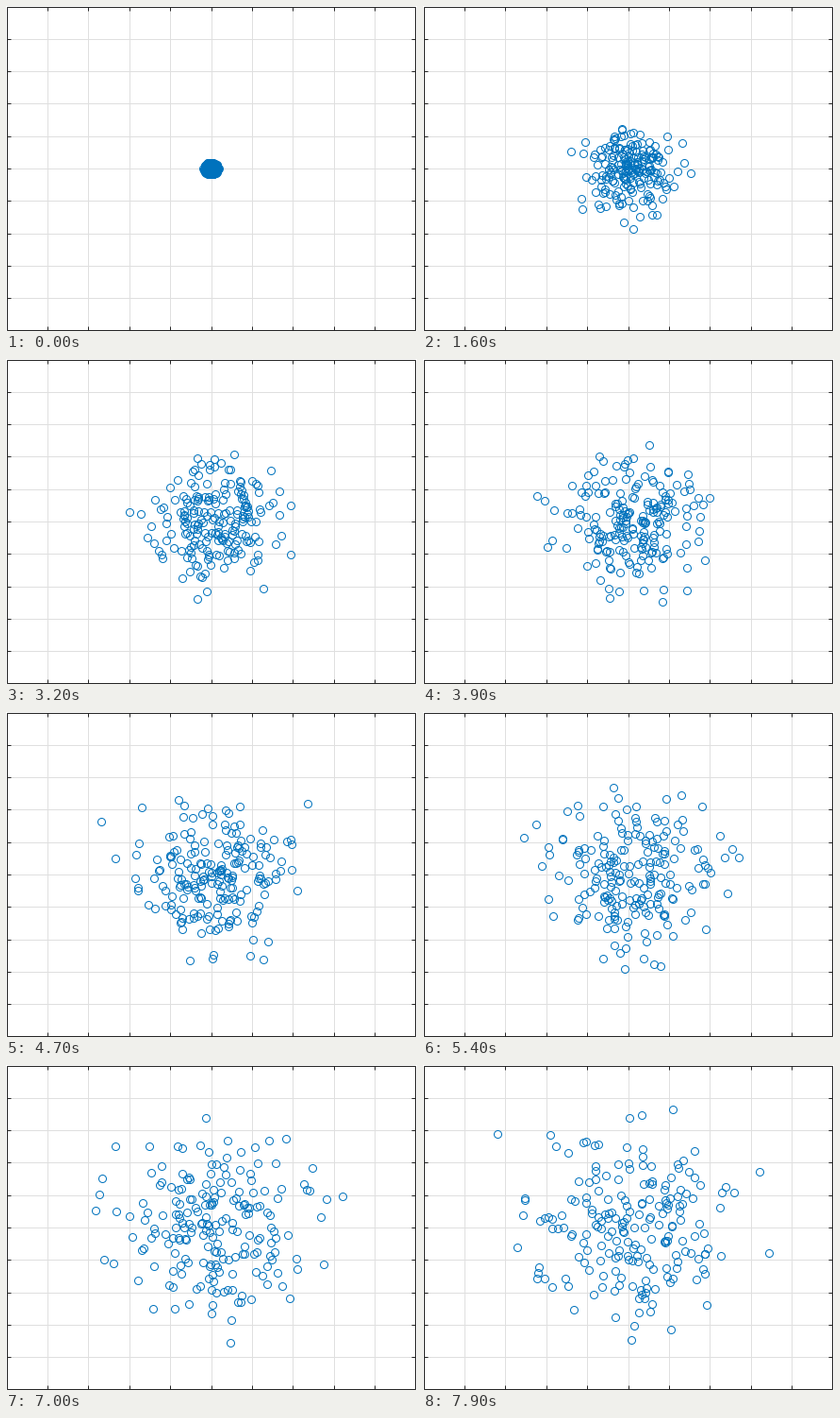
A matplotlib script that plays this animation: 436 px wide and 344 px high, repeating every 8000 ms.

```python
import numpy as np
import matplotlib.pyplot as plt
from matplotlib.animation import FuncAnimation
from matplotlib.collections import EllipseCollection

W, H, DPI = 436, 344, 100
PX = 72 / DPI                      # one pixel in points
FRAMES, COUNT, STEP = 80, 200, 0.2
CENTER = np.array([217.5, 172.0])
UNIT = np.array([43.35, 34.28])    # pixels per axis unit
TICK, DIAMETER = 4, 8
BLUE, DARK, GRID = "#0072bd", "#262626", "#dfdfdf"


def to_pixel(points):
    """Centre of the pixel nearest to each axis position."""
    return np.round(points) + 0.5


def make_walks():
    """Random walks with steps of fixed length, shaped (walker, step, xy)."""
    rng = np.random.default_rng(7)
    angle = rng.uniform(0, 2 * np.pi, (COUNT, FRAMES))
    length = np.full((COUNT, FRAMES), STEP)
    length[:, 0] *= 0.95 * np.sqrt(rng.random(COUNT))   # start in a disc
    moves = length[..., None] * np.stack([np.cos(angle), np.sin(angle)], -1)
    return to_pixel(CENTER + UNIT * moves.cumsum(axis=1))


def draw_axes(ax):
    ticks = np.arange(-5, 6)
    xs = to_pixel(CENTER[0] + UNIT[0] * ticks)
    ys = to_pixel(CENTER[1] + UNIT[1] * ticks)
    left, right, top, bottom = xs[0], xs[-1], ys[0], ys[-1]

    def line(x, y, color, z):
        ax.plot(x, y, color=color, lw=PX, snap=False, zorder=z,
                solid_capstyle="butt", solid_joinstyle="miter")

    for x in xs[1:-1]:
        line([x, x], [top, bottom], GRID, 1)
        line([x, x], [top, top + TICK], DARK, 2)
        line([x, x], [bottom - TICK, bottom], DARK, 2)
    for y in ys[1:-1]:
        line([left, right], [y, y], GRID, 1)
        line([left, left + TICK], [y, y], DARK, 2)
        line([right - TICK, right], [y, y], DARK, 2)
    ax.add_patch(plt.Rectangle((left, top), right - left, bottom - top,
                               fill=False, ec=DARK, lw=PX, snap=False,
                               zorder=2))


fig = plt.figure(figsize=(W / DPI, H / DPI), dpi=DPI, facecolor="white")
ax = fig.add_axes([0, 0, 1, 1])
ax.set_xlim(0, W)
ax.set_ylim(H, 0)
ax.axis("off")
draw_axes(ax)

walks = make_walks()
dots = EllipseCollection([DIAMETER], [DIAMETER], [0], units="dots",
                         offsets=walks[:, 0], offset_transform=ax.transData,
                         facecolors="none", edgecolors=BLUE, linewidths=PX,
                         zorder=3)
ax.add_collection(dots, autolim=False)


def update(i):
    dots.set_offsets(walks[:, i])
    return dots,


anim = FuncAnimation(fig, update, frames=FRAMES, interval=100,
                     repeat=True, repeat_delay=0, blit=False)
plt.show()
```
